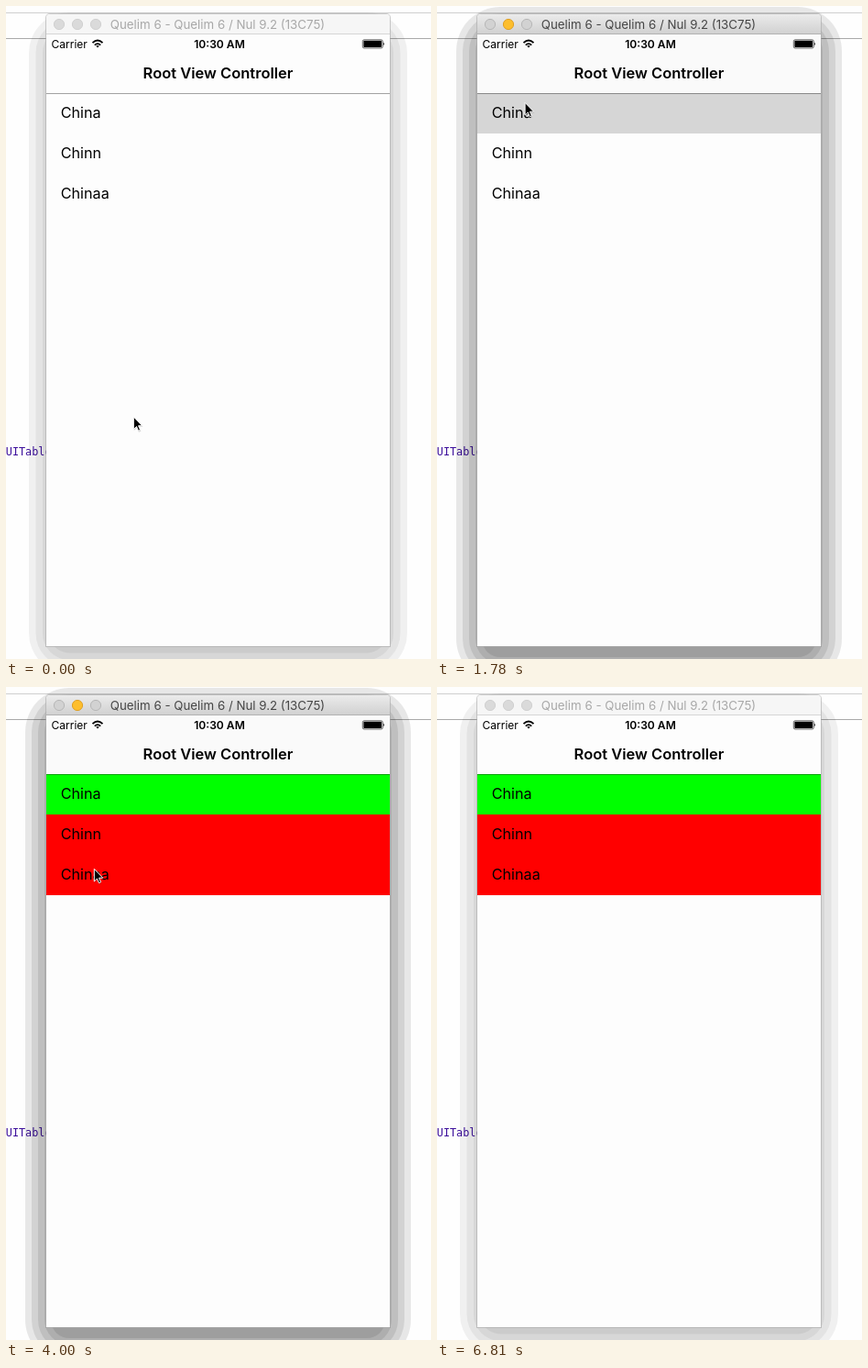
An HTML page for the animation above (6.83 s loop, 464 by 712 pixels).

```html
<!DOCTYPE html>
<html lang="en">
<head>
<meta charset="utf-8">
<title>Table view demo</title>
<style>
  html, body { margin: 0; width: 100%; height: 100%; overflow: hidden; background: #fff; }
  svg { display: block; width: 464px; height: 712px; }
  text { font-family: Inter, Roboto, sans-serif; white-space: pre; }
  .code { font: 11.8px "DejaVu Sans Mono", monospace; fill: #3c0f9c; }
  .semi { font-weight: 600; }
  .mid { text-anchor: middle; }
</style>
</head>
<body>
<svg id="stage" viewBox="0 0 464 712">
  <defs>
    <linearGradient id="chrome" x1="0" y1="0" x2="0" y2="1">
      <stop offset="0" stop-color="#ebebeb"/>
      <stop offset="1" stop-color="#d1d1d1"/>
    </linearGradient>
  </defs>
  <rect width="464" height="712" fill="#fefefe"/>
  <path d="M0 7.5H464" stroke="#cfcfcf"/>
  <path d="M0 35.5H464" stroke="#a9a9a9"/>
  <text class="code" x="-.2" y="490">UITable</text>
  <g id="shadowOff"></g>
  <g id="shadowOn"></g>

  <path d="M43.5 698.5V13q0-4.5 4.5-4.5H415q4.5 0 4.5 4.5V698.5Z" fill="#fdfdfd" stroke="#000" stroke-opacity=".2"/>
  <path id="bar" d="M44 30V13q0-4 4-4H415q4 0 4 4V30Z"/>
  <path id="barLine" d="M44 30.5H419"/>
  <g id="lights"></g>
  <text id="caption" class="mid" x="231" y="25" font-size="13.3">Quelim 6 - Quelim 6 / Nul 9.2 (13C75)</text>

  <rect id="nav" x="44" y="31" width="375" height="64"/>
  <text x="49.6" y="46" font-size="12">Carrier</text>
  <g fill="none" stroke="#000" stroke-width="1.8">
    <path d="M94.5 40.1Q100 34.9 105.5 40.1M96.8 42.6Q100 39.6 103.2 42.6"/>
    <path d="M98.3 43.6Q100 42.2 101.7 43.6L100 45.6Z" fill="#000" stroke="none"/>
  </g>
  <text class="semi mid" x="233" y="45.6" font-size="12.1">10:30 AM</text>
  <rect x="389.3" y="36.8" width="22" height="9.2" rx="1.8" fill="none" stroke="#000" stroke-width=".6"/>
  <rect x="390.4" y="37.8" width="19.8" height="7.2" rx=".8"/>
  <path d="M412.2 39.6q1.8 1.8 0 3.6Z"/>
  <text class="semi mid" x="231.5" y="79" font-size="16.5">Root View Controller</text>
  <g id="rows"></g>
  <path d="M44 95.5H419" stroke="#000" stroke-opacity=".36"/>

  <g id="cursor">
    <path d="M.8 1.4V15.4L4 12.6 6 17.2 8.4 16.2 6.5 11.6H10.7Z" opacity=".14"/>
    <path d="M.3 .4V14L3.5 11 5.5 15.7 7.6 14.8 5.6 10.2H9.8Z" stroke="#fff" stroke-linejoin="round"/>
  </g>
</svg>
<script>
const LOOP = 6830, TICK = 148.15;
const ACTIVE = 12, INACTIVE = 46;
const $ = id => document.getElementById(id);

function add(parent, tag, attrs, text = '') {
  const el = document.createElementNS('http://www.w3.org/2000/svg', tag);
  for (const k in attrs) el.setAttribute(k, attrs[k]);
  el.textContent = text;
  parent.append(el);
  return el;
}

// Stacked rounded bands that shrink by an even step
function shadow(id, { spread, step, top, bottom, opacity }) {
  for (let d = spread; d > -6; d -= step)
    add($(id), 'rect', {
      x: 44 - d, y: top - d, width: 375 + 2 * d, height: bottom - top + 2 * d, rx: 25 + d, opacity
    });
}
shadow('shadowOff', { spread: 19, step: 7.5, top: 26, bottom: 709, opacity: .053 });
shadow('shadowOn', { spread: 23, step: 7, top: 24, bottom: 715, opacity: .09 });

const lights = [0, 1, 2].map(i => add($('lights'), 'circle', { cx: 58 + 20 * i, cy: 20, r: 5.6 }));

const rows = [
  { label: 'China', press: 12, pick: 13, fill: '#0f0' },
  { label: 'Chinn', press: 21, pick: 21, fill: '#f00' },
  { label: 'Chinaa', press: 27, pick: 27, fill: '#f00' }
];
rows.forEach((row, i) => {
  const y = 95 + 44 * i;
  row.rect = add($('rows'), 'rect', { x: 44, y, width: 375, height: 44 });
  add($('rows'), 'text', { x: 59.7, y: y + 27.4, 'font-size': 16.2 }, row.label);
});

// Pointer moves in ticks; an optional control point bends the way
const home = [139, 447.5];
const moves = [
  { from: 3, till: 11, to: [95.8, 105], via: [468, 584] },
  { from: 13, till: 18, to: [98, 161] },
  { from: 21, till: 25, to: [96, 198] },
  { from: 28, till: 31, to: [176.5, 317] },
  { from: 35, till: 38, to: [217, 356], via: [168, 321] },
  { from: 39, till: 45, to: [300, -22] }
];

function pointer(n) {
  let pos = home;
  for (const { from, till, to, via } of moves) {
    if (n <= from) break;
    const k = Math.min(1, (n - from) / (till - from));
    pos = pos.map((a, i) => {
      const c = via ? via[i] : (a + to[i]) / 2;
      return (1 - k) ** 2 * a + 2 * k * (1 - k) * c + k * k * to[i];
    });
  }
  return pos;
}

function setWindow(on) {
  $('shadowOn').style.display = on ? '' : 'none';
  $('shadowOff').style.display = on ? 'none' : '';
  $('bar').setAttribute('fill', on ? 'url(#chrome)' : '#f6f6f6');
  $('barLine').setAttribute('stroke', on ? '#b2b2b2' : '#d6d6d6');
  $('caption').setAttribute('fill', on ? '#464646' : '#a8a8a8');
  $('nav').setAttribute('fill', on ? '#fafafa' : '#fdfdfd');
  lights.forEach((c, i) => {
    const amber = on && i === 1;
    c.setAttribute('fill', amber ? '#fdbe2d' : on ? '#d2d2d2' : '#dadada');
    c.setAttribute('stroke', amber ? '#dfa023' : on ? '#b7b7b7' : '#d0d0d0');
  });
}

function draw(ms) {
  const n = Math.floor((ms % LOOP + 7) / TICK);
  setWindow(n >= ACTIVE && n < INACTIVE);
  for (const { rect, press, pick, fill } of rows)
    rect.setAttribute('fill', n >= pick ? fill : n >= press ? '#d6d6d6' : 'none');
  $('cursor').setAttribute('transform', `translate(${pointer(n)})`);
}

const start = performance.now();
function frame() {
  draw(performance.now() - start);
  requestAnimationFrame(frame);
}
frame();
</script>
</body>
</html>
```
